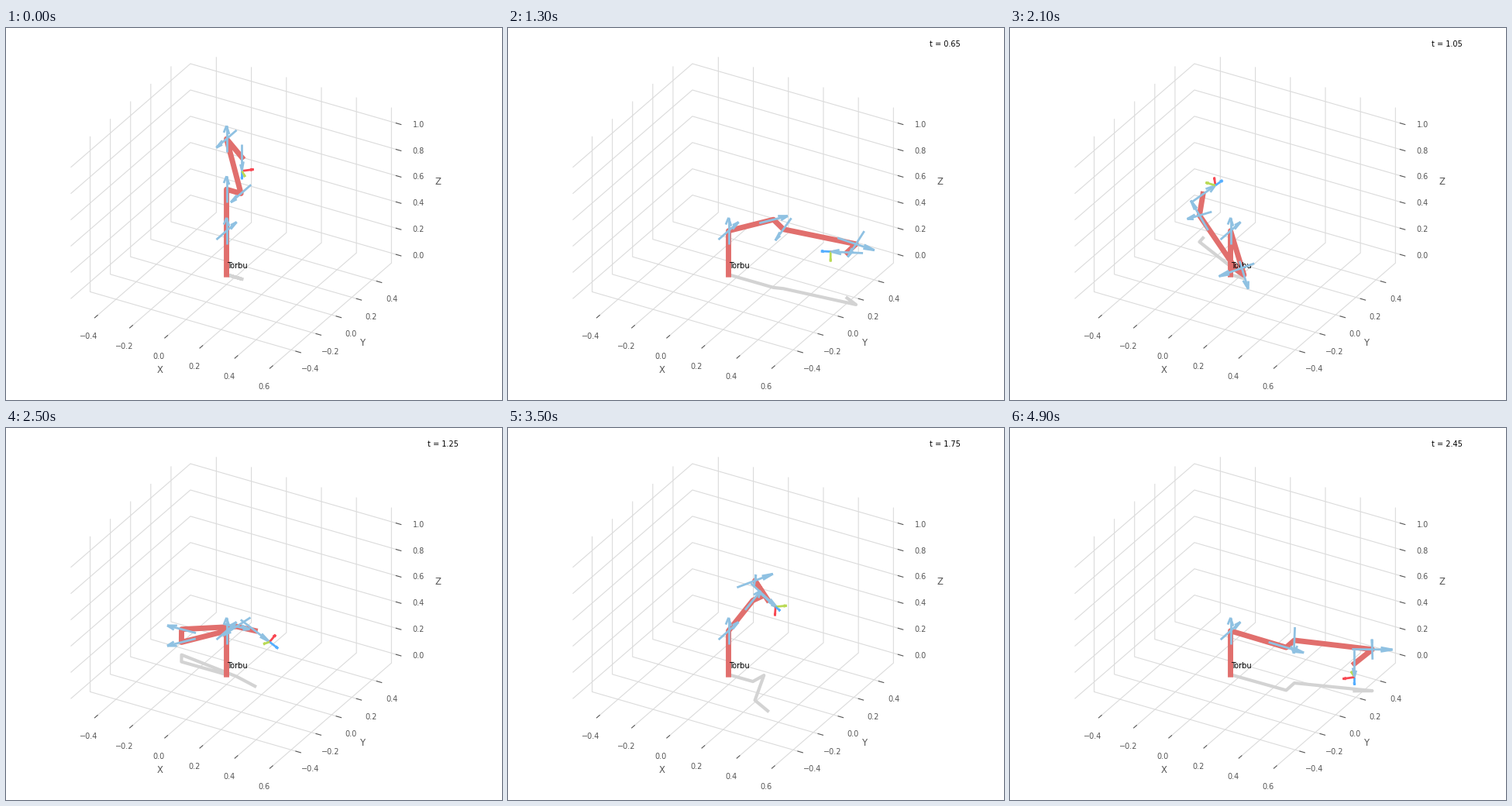
A matplotlib script for the animation above (5000 ms loop, 640 by 480 pixels).

```python
import numpy as np
import matplotlib.pyplot as plt
from matplotlib.animation import FuncAnimation

FRAMES, INTERVAL, STEP = 50, 100, 0.05
JOINT_AXIS, TOOL_AXIS = 0.2, 0.06

plt.rcParams.update({
    "font.family": "DejaVu Sans",
    "font.size": 7,
    "axes.labelsize": 8.4,
    "axes.labelpad": 1,
    "axes.labelcolor": "#555555",
    "axes.edgecolor": "white",
    "xtick.color": "#555555",
    "ytick.color": "#555555",
    "grid.color": "#dbdbdb",
})

# Modified Denavit-Hartenberg rows: a, d, alpha in quarter turns
LINKS = [
    (0, 0.333, 0),
    (0, 0, -1),
    (0, 0.316, 1),
    (0.0825, 0, 1),
    (-0.0825, 0.384, -1),
    (0, 0, 1),
    (0.088, 0.107, 1),
]
GOAL = np.array([0.01044, 7.876, 1.557, -6.81, 1.571, 4.686, 0.5169])


def link_pose(a, d, quarter, theta):
    ct, st = np.cos(theta), np.sin(theta)
    ca, sa = np.cos(quarter * np.pi / 2), np.sin(quarter * np.pi / 2)
    return np.array([
        [ct, -st, 0, a],
        [st * ca, ct * ca, -sa, -d * sa],
        [st * sa, ct * sa, ca, d * ca],
        [0, 0, 0, 1],
    ])


TOOL = link_pose(0, 0.103, 0, -np.pi / 4)


def forward(q):
    """Poses of the base and of every joint."""
    poses = [np.eye(4)]
    for link, angle in zip(LINKS, q):
        poses.append(poses[-1] @ link_pose(*link, angle))
    return poses


def quintic(u):
    return u**3 * (10 - 15 * u + 6 * u**2)


fig = plt.figure(figsize=(6.4, 4.8), dpi=100, facecolor="white")
fig.subplots_adjust(left=-0.09, bottom=0, top=1, right=0.99)
ax = fig.add_subplot(projection="3d", proj_type="ortho", facecolor="white")

radius = 1.033 * 1.1 * 25 / 24 / 2
for name, centre in zip("xyz", (0.044, 0, 0.5165)):
    ax.set(**{f"{name}lim": (centre - radius, centre + radius),
              f"{name}label": name.upper()})
for axis in (ax.xaxis, ax.yaxis, ax.zaxis):
    axis.set_pane_color((1, 1, 1, 0))

ax.text(0, 0, 0.05, "Torbu")
clock = fig.text(0.85, 0.95, "")
shadow, = ax.plot([], [], [], color="lightgrey", linewidth=3)
arm, = ax.plot([], [], [], color="#E16F6D", linewidth=5)
arrows = []


def add_arrow(start, vector, color):
    arrows.append(ax.quiver(*start, *vector, color=color, linewidth=2))


def draw(frame):
    while arrows:
        arrows.pop().remove()
    poses = forward(GOAL * quintic(frame / (FRAMES - 1)))
    x, y, z = np.array([pose[:3, 3] for pose in poses]).T
    shadow.set_data_3d(x, y, np.zeros_like(z))
    arm.set_data_3d(x, y, z)

    for pose in poses[1:]:
        vector = JOINT_AXIS * pose[:3, 2]
        add_arrow(pose[:3, 3] - vector / 2, vector, "#8FC1E2")
    tip = poses[-1] @ TOOL
    for k, color in enumerate(("#F84752", "#BADA55", "#54AEFF")):
        add_arrow(tip[:3, 3], TOOL_AXIS * tip[:3, k], color)

    clock.set_text(f"t = {frame * STEP:.2f}" if frame else "")


anim = FuncAnimation(fig, draw, frames=FRAMES, interval=INTERVAL,
                     repeat=True, repeat_delay=0)
plt.show()
```
